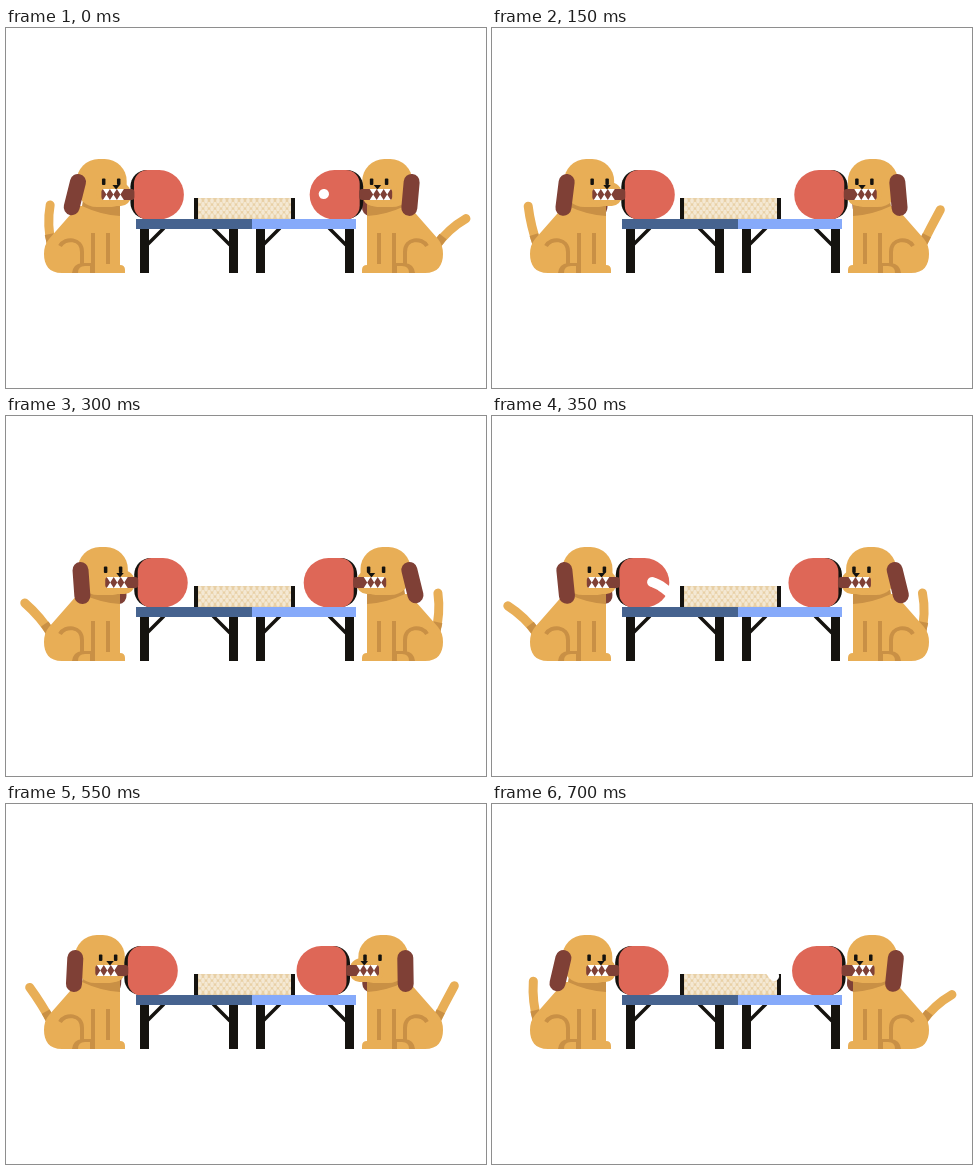
An HTML page with a canvas that plays this animation: 480 px wide and 360 px high, repeating every 750 ms.

```html
<!DOCTYPE html>
<html>
<head>
<meta charset="utf-8">
<style>
html, body { margin: 0; width: 100%; height: 100%; overflow: hidden; background: #fff; }
canvas { display: block; }
</style>
</head>
<body>
<canvas id="stage" width="480" height="360"></canvas>
<script>
const ctx = document.getElementById('stage').getContext('2d');
const LOOP = 750, STEP = 50;
const RIGHT_DELAY = 325; // the right dog repeats the left one's moves later
const RETURN_TIME = 362; // the ball starts its way back
const FUR = '#e8ae56', SHADE = '#c99045', BROWN = '#7f4036', RED = '#de6757', BLACK = '#15130f';

const turn = (t, from) => 2 * Math.PI * (t - from) / LOOP;
const mix = (a, b, u) => a + (b - a) * u;

function rect(color, x, y, w, h, r = 0) {
  ctx.fillStyle = color;
  ctx.beginPath();
  ctx.roundRect(x, y, w, h, r);
  ctx.fill();
}

function fill(color, d) {
  ctx.fillStyle = color;
  ctx.fill(new Path2D(d));
}

function line(color, width, d, cap = 'butt') {
  ctx.strokeStyle = color;
  ctx.lineWidth = width;
  ctx.lineCap = cap;
  ctx.stroke(new Path2D(d));
}

function placed(x, y, degrees, draw) {
  ctx.save();
  ctx.translate(x, y);
  ctx.rotate(degrees * Math.PI / 180);
  draw();
  ctx.restore();
}

function drawTail(angle) {
  const bend = (angle - 25) * .2;
  placed(46, 219, -angle, () => {
    line(FUR, 9, `M0 0Q${bend} -22 0 -42`, 'round');
    line(SHADE, 9, `M0 0L${bend * .5} -13`);
  });
}

function drawBody() {
  fill(FUR, 'M72 178H114V237Q119 237 119 242V245H56C43 245 38 237 38 226Q38 217 43 211Z');
  fill(SHADE, 'M77 172H114V188Q95 187 76 178Z');
  line(SHADE, 4, 'M54 218C59 209 76 210 76 224V236M87 205V236M102 205V236');
  fill(SHADE, 'M66 245Q67 236 76 235H89V245Z');
  fill(FUR, 'M72 245Q72 238 79 238H84V245Z');
}

function drawEar(x, angle) {
  placed(x, 152, angle, () => rect(BROWN, -8, -6, 16, 42, 8));
}

function drawFace(shift) {
  placed(shift * .3, 0, 0, () => rect(FUR, 71, 131, 50, 48, [22, 22, 15, 20]));
  placed(shift, 0, 0, () => {
    rect(FUR, 92, 154, 34, 24, [8, 12, 10, 10]);
    rect(BLACK, 125.5, 142, 40, 49, [17, 24, 24, 17]);
    rect(RED, 129, 142, 50, 49.5, [14, 25, 25, 14]);
    rect(BROWN, 96.5, 161, 33, 11, 3);
    let teeth = '';
    for (let x = 98; x < 119; x += 7)
      teeth += `M${x} 161h7l-3.5 5.5zM${x} 172h7l-3.5 -5.5z`;
    fill('#fff', teeth);
    fill(BLACK, 'M107.5 157H115L111.2 161.5Z');
  });
  placed(shift * .5, 0, 0, () => {
    for (const x of [96.5, 111.5]) rect(BLACK, x, 150.5, 3.5, 6.5, 1);
  });
}

function drawDog(t) {
  const w = turn(t, 350);
  const shift = -1.7 - 7.2 * Math.sin(w + .6 * Math.sin(w)); // slow forward, quick back
  const ear = 4 + 10 * Math.cos(turn(t, 0));
  drawEar(110 + shift * .2, ear);
  drawTail(25 + 23 * Math.cos(turn(t, 400)));
  drawBody();
  drawFace(shift);
  drawEar(73 + shift * .5, ear);
}

function drawTable() {
  rect('#e8d0a6', 191, 170, 95, 21);
  ctx.fillStyle = '#f4e8d3';
  for (let row = 0; row < 5; row++)
    for (let x = 194 + row % 2 * 3; x < 285; x += 6) {
      ctx.beginPath();
      ctx.ellipse(x, 172.8 + row * 3.8, 1.8, 2.8, 0, 0, 7);
      ctx.fill();
    }
  for (const x of [188, 285]) rect(BLACK, x, 170, 4, 21);
  for (const x of [134, 250]) {
    rect(BLACK, x, 200, 9, 45);
    rect(BLACK, x + 89, 200, 9, 45);
    line(BLACK, 3.5, `M${x + 24} 200l-17 17m66 -17l17 17`);
  }
  rect('#46638f', 130, 191, 116, 10);
  rect('#86aafa', 246, 191, 104, 10);
}

// One stroke from the left paddle: dwell, arc over the net, bounce, rise to the right paddle
function strokeAt(p) {
  if (p < .23) return [mix(160, 165, p / .23), mix(166, 160, p / .23)];
  if (p < .925) {
    const u = (p - .23) / .695;
    return [mix(165, 292, u), mix(160, 186, u) - 168 * u * (1 - u)];
  }
  const u = Math.min(1, (p - .925) / .042);
  return [mix(292, 318, u), mix(186, 166, u) - 12 * u * (1 - u)];
}

function ballAt(t) {
  t = (t + LOOP) % LOOP;
  if (t >= RETURN_TIME) return strokeAt((t - RETURN_TIME) / (LOOP - RETURN_TIME));
  const [x, y] = strokeAt(t / RETURN_TIME);
  return [478 - x, y];
}

function drawBall(t) {
  let d = 'M' + ballAt(t);
  for (let back = 1; back <= 13; back += 2) d += 'L' + ballAt(t - back);
  ctx.lineJoin = 'round';
  line('#fff', 10, d + 'l.01 0', 'round');
}

function frame(now) {
  const t = Math.floor(now % LOOP / STEP) * STEP;
  ctx.fillStyle = '#fff';
  ctx.fillRect(0, 0, 480, 360);
  drawDog(t);
  ctx.save();
  ctx.translate(475, 0);
  ctx.scale(-1, 1);
  drawDog(t - RIGHT_DELAY);
  ctx.restore();
  drawTable();
  drawBall(t);
}

const start = performance.now();
function tick() {
  frame(performance.now() - start);
  requestAnimationFrame(tick);
}
tick();
</script>
</body>
</html>
```
